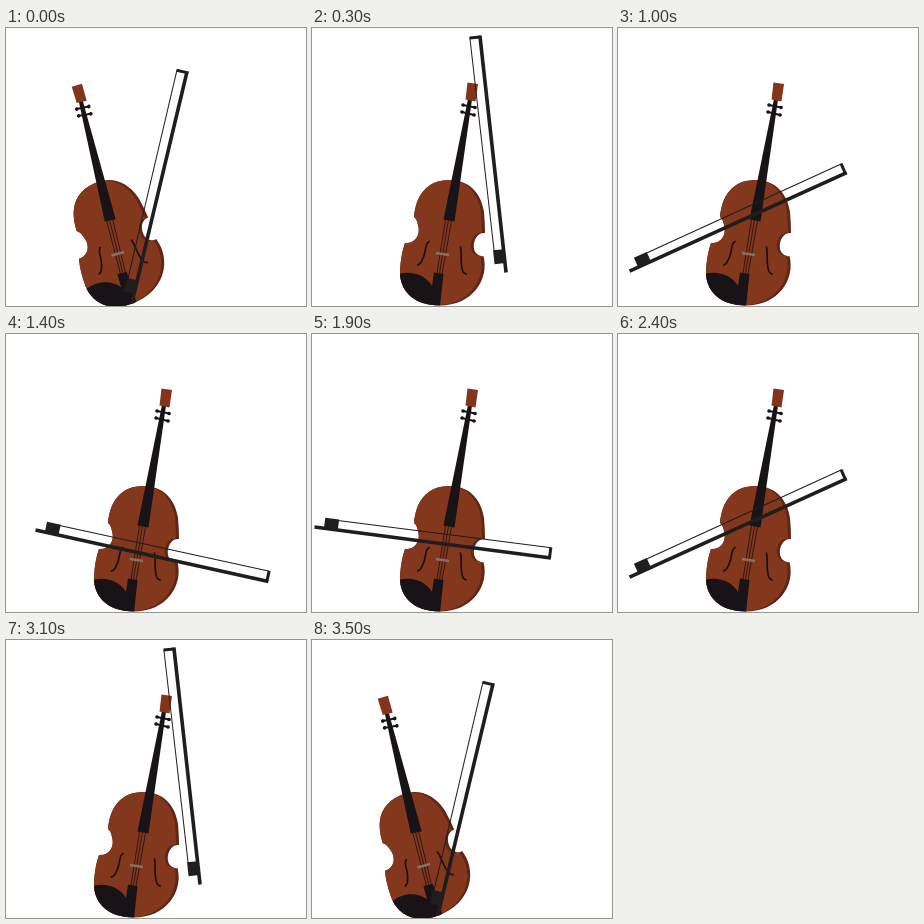
An HTML page for the animation above (4500 ms loop, 300x278 px).

```html
<!DOCTYPE html>
<html lang="en">
<head>
<meta charset="utf-8">
<title>Violin and bow</title>
<style>
  html, body { margin: 0; width: 100%; height: 100%; overflow: hidden; background: #fff; }
  svg { display: block; width: 100%; height: 100%; }
</style>
</head>
<body>
<svg viewBox="0 0 300 278" fill="none">
  <defs>
    <path id="shape" d="M138 152C156 152 169 164 172 184Q173 195 173 205C163 204 159 219 164 225Q167 229 171.500 228C177.500 252 160 277.500 128 277.500C99 277.500 87 260 88 242Q89 226 93 215C103 216 109 207 106 197Q105 191 102 189C104 168 114 152 138 152Z"/>
    <clipPath id="inside"><use href="#shape"/></clipPath>
  </defs>

  <g id="violin">
    <use href="#shape" fill="#5f2515"/>
    <g clip-path="url(#inside)">
      <use href="#shape" x="-3" y="-.5" fill="#83371c"/>
      <path d="M86 246C100 242 114 247 120 258L122 244.500L131.500 246L128 279H86Z" fill="#171316"/>
    </g>
    <path d="M133.500 192L125 245M136.500 192L127.500 245M139.500 193L130 246" stroke="#2b1510" stroke-width=".9"/>
    <path d="M124 225L137 227" stroke="#8d6e64" stroke-width="2.500"/>
    <path d="M117 213.500C113 215 114.500 222 111.500 229S108 236 105.500 237M148.500 219C150 225 148.500 230 149.500 237S151 244.500 154 246" stroke="#1c1110" stroke-width="1.700" stroke-linecap="round"/>
    <path d="M156 71L160 71.500L142.500 193.500L131.500 191.500Z" fill="#171316"/>
    <path d="M151 77L163 79.500M150 84L162 87" stroke="#171316" stroke-width="2"/>
    <path d="M151 77h.1M163 79.500h.1M150 84h.1M162 87h.1" stroke="#171316" stroke-width="3.600" stroke-linecap="round"/>
    <path d="M155.500 54.500L166 56L163.500 73.500L153.500 71.500Z" fill="#83341a"/>
  </g>

  <g id="bow" stroke="#1f1d1e">
    <path d="M-.5 0H238" stroke-width="3.600"/>
    <path d="M236.500 0V-10.500" stroke-width="3"/>
    <path d="M237 -10.200L22 -9.500" stroke-width="1"/>
    <path d="M9 0V-10.500H23V0Z" fill="#1f1d1e" stroke="none"/>
  </g>
</svg>
<script>
const LOOP = 4500, STEP = 100;
const violin = document.getElementById('violin');
const bow = document.getElementById('bow');

// Bow poses: x and y of the frog end, angle in degrees
const rest = [126, 274.7, -76.6];
const upright = [194, 244, -96.3];
const swing = [97, 274, -70];
const ready = [12, 243, -24.4];
const near = [3, 208, -2];
const pull = [3, 193, 7.5];
const push = [30, 196, 12.5];

const bowKeys = [
  [0, rest], [300, upright], [400, upright], [700, swing], [1000, ready],
  [1200, near], [1300, pull], [1400, push], [1500, push], [1600, pull],
  [1700, push], [1800, push], [1900, pull], [2000, push], [2100, push],
  [2200, pull], [2400, ready], [2700, swing], [2800, swing],
  [3100, upright], [3200, upright], [3500, rest], [LOOP, rest]
];
const tiltKeys = [[0, [-23.7]], [300, [0]], [3200, [0]], [3500, [-23.7]], [LOOP, [-23.7]]];

function poseAt(keys, t) {
  const i = keys.findIndex(([time]) => time > t);
  const [t0, a] = keys[i - 1], [t1, b] = keys[i];
  const k = (t - t0) / (t1 - t0);
  return a.map((v, n) => v + (b[n] - v) * k);
}

function render(ms) {
  const t = Math.floor((ms % LOOP) / STEP) * STEP;
  const [tilt] = poseAt(tiltKeys, t);
  const [x, y, angle] = poseAt(bowKeys, t);
  violin.setAttribute('transform', `rotate(${tilt} 120.5 270.5)`);
  bow.setAttribute('transform', `translate(${x} ${y}) rotate(${angle})`);
}

const start = performance.now();
function tick() {
  render(performance.now() - start);
  requestAnimationFrame(tick);
}
tick();
</script>
</body>
</html>
```
